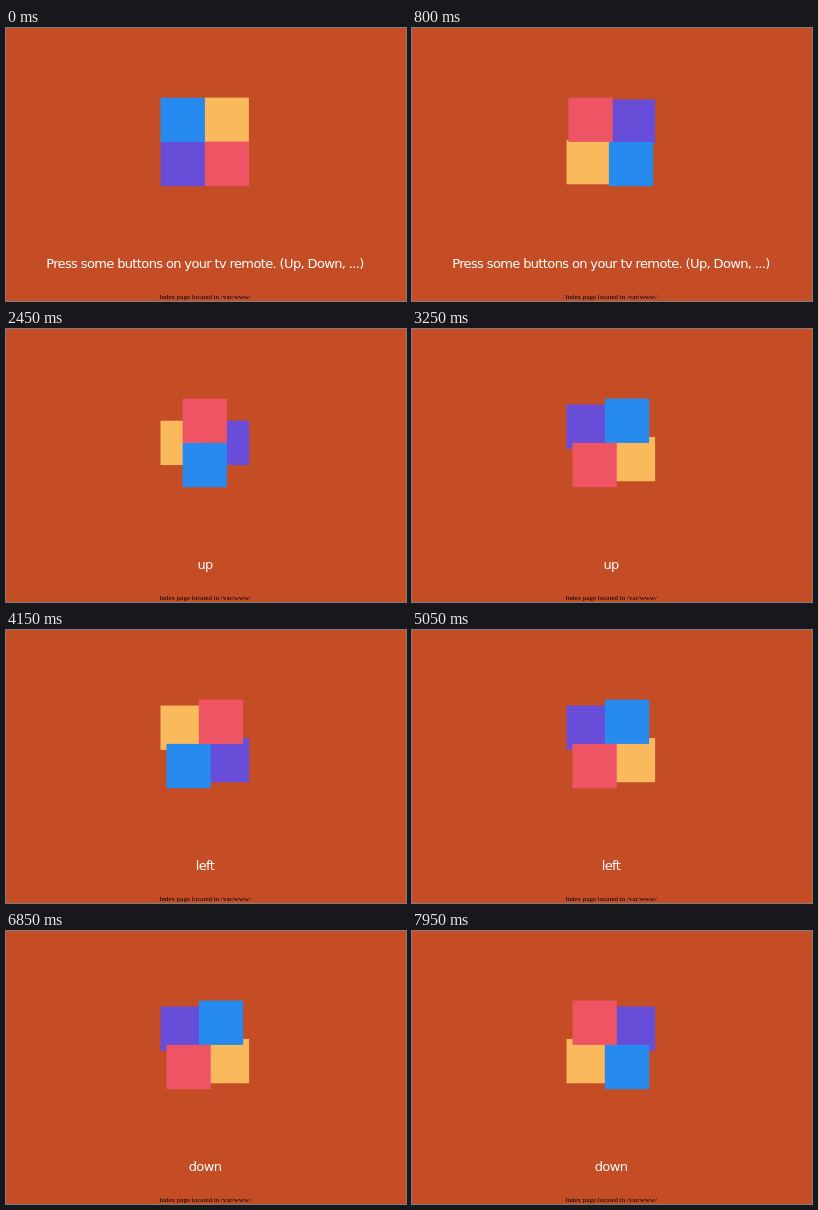
An HTML page that plays this animation: 400 px wide and 273 px high, repeating every 8000 ms.

```html
<!DOCTYPE html>
<html lang="en">
<head>
<meta charset="utf-8">
<title>Remote buttons</title>
<style>
  html, body { margin: 0; width: 100%; height: 100%; overflow: hidden; background: #c44d26; }
  svg { display: block; width: 100%; height: 100%; }
  text { text-anchor: middle; }
  #label { font: 13px "DejaVu Sans", Tahoma, sans-serif; letter-spacing: -.63px; fill: #fff; }
  #note { font: 7px "Liberation Serif", "Times New Roman", serif; fill: #000; }
</style>
</head>
<body>
<svg viewBox="0 0 400 273">
  <rect width="400" height="273" fill="#c44d26"/>
  <g id="tiles"></g>
  <text id="label" x="199" y="240"></text>
  <text id="note" x="199" y="271">Index page located in /var/www/</text>
</svg>
<script>
const LOOP = 8000, TICK = 50, STEP = 450;
const LEFT = 154.5, TOP = 69.6, SIZE = 44.3;

// Corners in counter-clockwise order, in tile units
const corners = [[0, 0], [0, 1], [1, 1], [1, 0]];

// Listed back to front; start is the index of the first corner
const tiles = [
  { start: 1, fill: '#674dd8' },
  { start: 3, fill: '#f9b95c' },
  { start: 0, fill: '#268aef' },
  { start: 2, fill: '#ee5464' }
];

const labels = [
  [0, 'Press some buttons on your tv remote. (Up, Down, ...)'],
  [2100, 'up'],
  [4000, 'left'],
  [5400, 'right'],
  [6300, 'down']
];

const group = document.getElementById('tiles');
const label = document.getElementById('label');

for (const tile of tiles) {
  tile.el = document.createElementNS('http://www.w3.org/2000/svg', 'rect');
  tile.el.setAttribute('width', SIZE);
  tile.el.setAttribute('height', SIZE);
  tile.el.setAttribute('fill', tile.fill);
  group.appendChild(tile.el);
}

const bezier = (a, b, u) =>
  3 * a * u * (1 - u) ** 2 + 3 * b * u * u * (1 - u) + u ** 3;

// cubic-bezier(.5, 0, .5, 1)
function ease(x) {
  let lo = 0, hi = 1;
  for (let i = 0; i < 24; i++) {
    const mid = (lo + hi) / 2;
    if (bezier(.5, .5, mid) < x) lo = mid; else hi = mid;
  }
  return bezier(0, 1, lo);
}

function render(time) {
  const t = Math.floor((time % LOOP) / TICK) * TICK;
  const phase = (t + TICK / 2) / STEP;
  const step = Math.floor(phase);
  const k = ease(phase - step);

  for (const { el, start } of tiles) {
    const from = corners[(start + step) % 4];
    const to = corners[(start + step + 1) % 4];
    const at = i => (from[i] + (to[i] - from[i]) * k) * SIZE;
    el.setAttribute('x', LEFT + at(0));
    el.setAttribute('y', TOP + at(1));
  }

  const text = labels.filter(([begin]) => begin <= t).pop()[1];
  if (label.textContent !== text) label.textContent = text;
}

const origin = performance.now();
function loop() {
  render(performance.now() - origin);
  requestAnimationFrame(loop);
}
loop();
</script>
</body>
</html>
```
